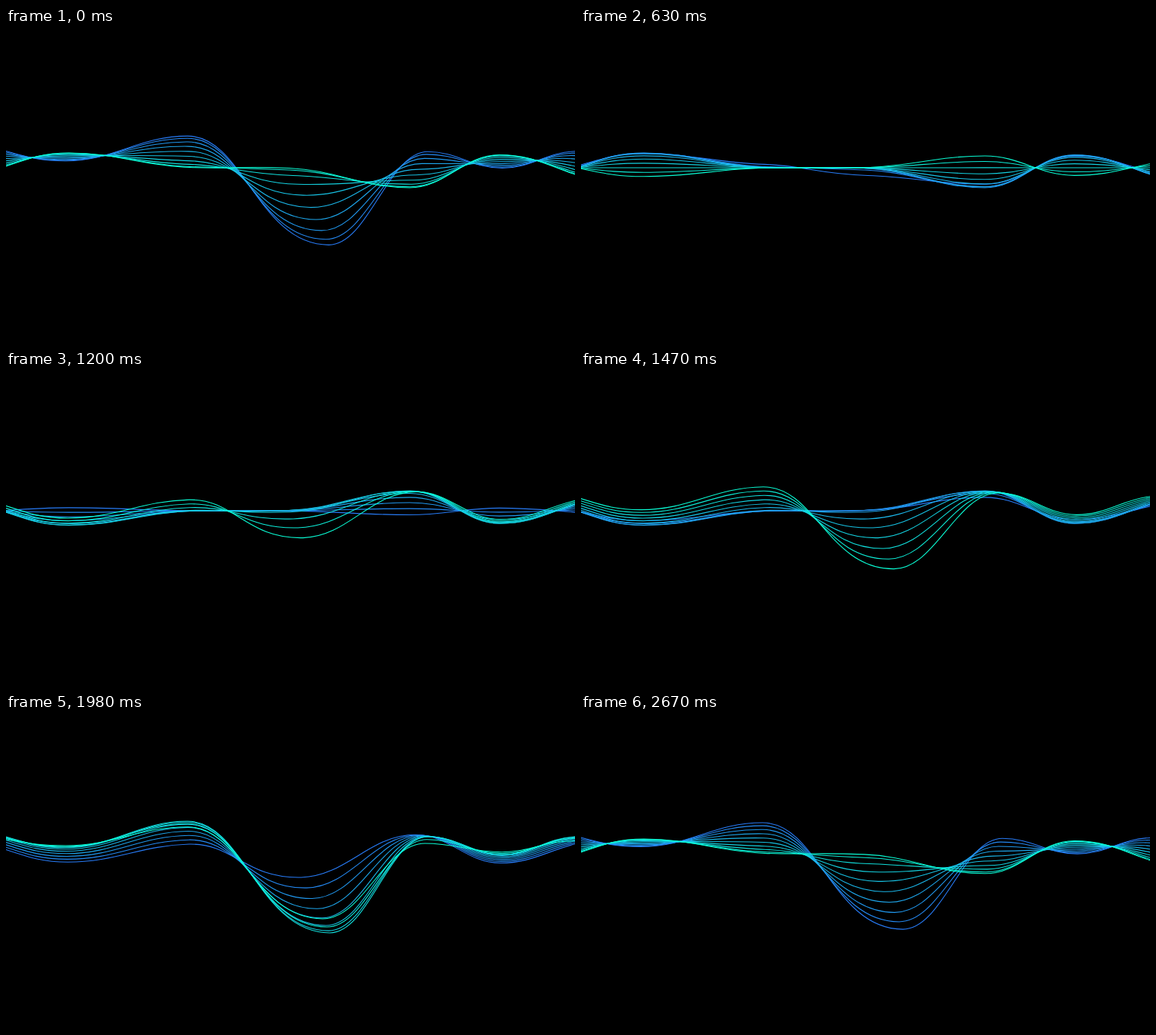
An HTML page for the animation above (2700 ms loop, 768x426 px).

```html
<!DOCTYPE html>
<html lang="en">
<head>
<meta charset="utf-8">
<title>Wave lines</title>
<style>
  html, body { margin: 0; width: 100%; height: 100%; overflow: hidden; background: #000; }
  svg { display: block; width: 100%; height: 100%; }
  path { fill: none; stroke-width: 1.1; }
</style>
</head>
<body>
<svg id="stage" viewBox="0 0 768 426"></svg>
<script>
const LOOP = 2700, STEP = 900, LAG = 90, COUNT = 10, AXIS = 189, PULL = 0.4;

const mix = (a, b, k) => a + (b - a) * k;
const sine = u => (1 - Math.cos(Math.PI * u)) / 2;

// Knots are [x, y, slope, pull of the incoming handle].
function curve(knots) {
  const pts = knots[0].slice(0, 2);
  for (let i = 1; i < knots.length; i++) {
    const [x0, y0, m0 = 0] = knots[i - 1];
    const [x1, y1, m1 = 0, pull = PULL] = knots[i];
    const out = (x1 - x0) * PULL, back = (x1 - x0) * pull;
    pts.push(x0 + out, y0 + out * m0, x1 - back, y1 - back * m1, x1, y1);
  }
  return pts;
}

const swell = curve([
  [0, 166, 0.3], [80, 180], [245, 145], [437, 296, 0, 0.5],
  [570, 166], [670, 190], [768, 166, -0.05]
]);
const ripple = curve([
  [0, 187, -0.35], [85, 169], [248, 188.5, 0.04], [382, 189.5, 0.04, 0.5],
  [545, 216], [666, 171.5], [768, 198, 0.35]
]);
const mirror = ripple.map((v, i) => i % 2 ? 2 * AXIS - v : v);

function bezier(x1, y1, x2, y2) {
  const at = (a, b, s) => 3 * a * s * (1 - s) ** 2 + 3 * b * s * s * (1 - s) + s ** 3;
  return u => {
    let lo = 0, hi = 1;
    for (let i = 0; i < 20; i++) {
      const mid = (lo + hi) / 2;
      if (at(x1, x2, mid) < u) lo = mid; else hi = mid;
    }
    return at(y1, y2, lo);
  };
}
const brisk = bezier(0.3, 0.16, 0.68, 0.99);

const phases = [
  [swell, ripple, sine],
  [ripple, mirror, sine],
  [mirror, swell, brisk],
  [swell, ripple, brisk]
];

function shape(local) {
  const pos = Math.min(Math.max(local / STEP + 1, 0), 3.9999);
  const n = Math.floor(pos);
  const [from, to, ease] = phases[n];
  const k = ease(pos - n);
  const pts = from.map((v, i) => mix(v, to[i], k).toFixed(2));
  return "M" + pts.slice(0, 2) + "C" + pts.slice(2);
}

const lead = [10, 255, 215], tail = [40, 125, 250];
const stage = document.getElementById("stage");
const lines = [];
for (let k = COUNT - 1; k >= 0; k--) {
  const el = document.createElementNS(stage.namespaceURI, "path");
  const rgb = lead.map((v, i) => Math.round(mix(v, tail[i], k / (COUNT - 1))));
  el.setAttribute("stroke", `rgb(${rgb})`);
  stage.appendChild(el);
  lines.push({ el, delay: k * LAG });
}

function draw(t) {
  for (const { el, delay } of lines) el.setAttribute("d", shape(t - delay));
}

const start = performance.now();
function tick() {
  draw((performance.now() - start) % LOOP);
  requestAnimationFrame(tick);
}
tick();
</script>
</body>
</html>
```
